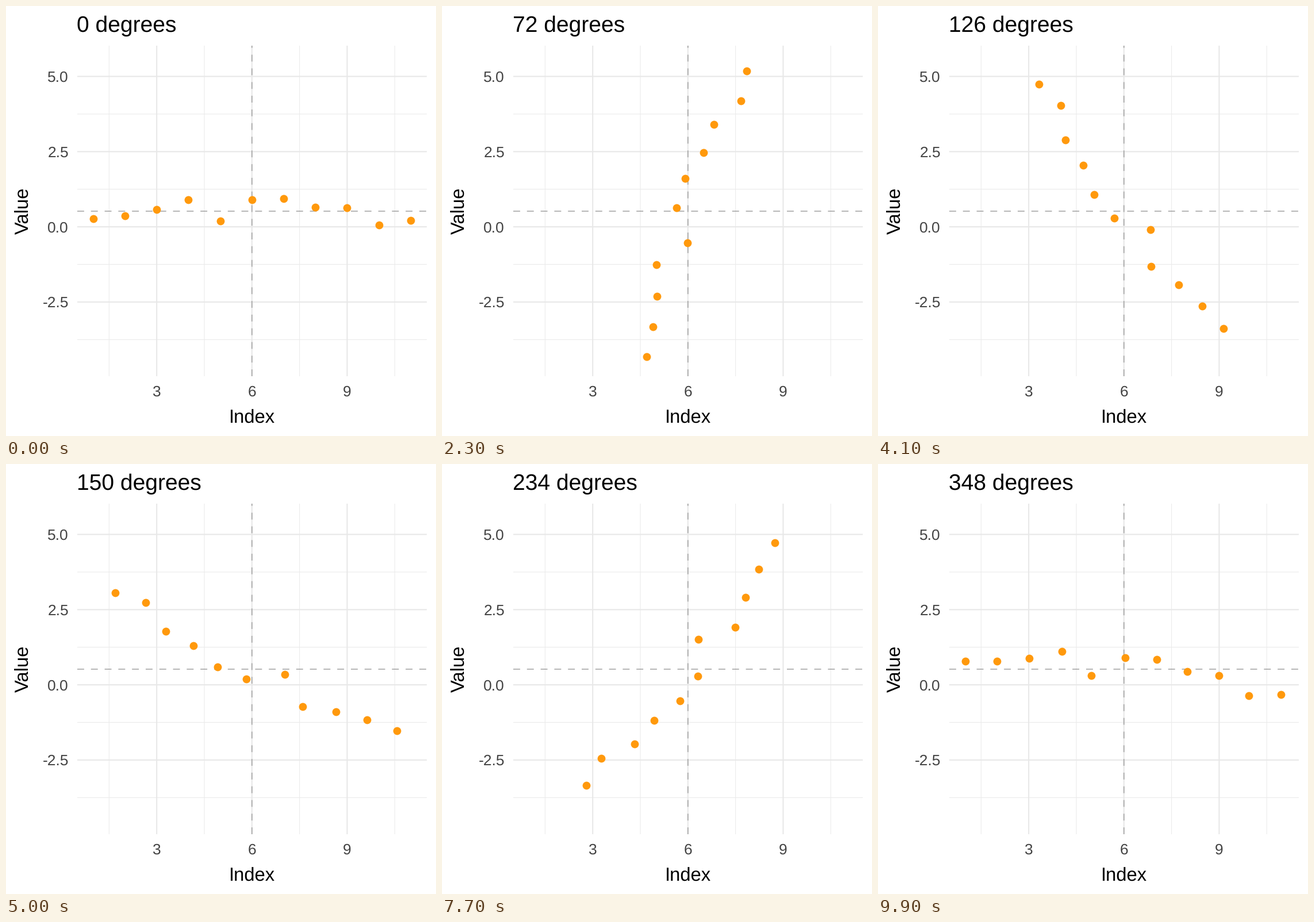
A matplotlib script for the animation above (10 s loop, 748 px wide and 748 px high).

```python
import numpy as np
import matplotlib.pyplot as plt
from matplotlib.animation import FuncAnimation

SIZE, DPI = 748, 72
FRAMES, INTERVAL = 100, 100
LEFT, RIGHT, TOP, BOTTOM = 124, 732, 69, 644
STEP = 6          # degrees between neighbouring states
SLOW = 82         # frames with two per state; one per state afterwards
TITLE, BASE, TICK = 39, 32.8, 26.4   # text sizes in pixels

plt.rcParams["font.family"] = "Liberation Sans"
plt.rcParams["text.hinting"] = "none"
plt.rcParams["lines.scale_dashes"] = False

index = np.arange(1, 12)
value = np.array([0.2655, 0.3721, 0.5729, 0.9082, 0.2017, 0.8984,
                  0.9447, 0.6608, 0.6291, 0.0618, 0.2060])
mid_x, mid_y = index.mean(), value.mean()


def px(x):
    return 427.8 + (np.asarray(x) - 6) * 55.22


def py(y):
    return 384.1 - np.asarray(y) * 52.32


def rotated(degrees):
    a = np.radians(degrees)
    dx, dy = index - mid_x, value - mid_y
    return (mid_x + dx * np.cos(a) - dy * np.sin(a),
            mid_y + dx * np.sin(a) + dy * np.cos(a))


def pose(frame):
    """Return the state before, the share of the way to the next, the label."""
    if frame == 0:
        return 0, 0.0, 0
    if frame < SLOW:
        state, odd = divmod(frame, 2)
        return state * STEP, (odd + 1) / 2, (state + odd) * STEP
    state = SLOW // 2 + frame - SLOW
    return state * STEP, 1.0, state * STEP


fig = plt.figure(figsize=(SIZE / DPI, SIZE / DPI), dpi=DPI, facecolor="white")
ax = fig.add_axes([0, 0, 1, 1])
ax.set_xlim(0, SIZE)
ax.set_ylim(SIZE, 0)
ax.axis("off")


def vline(x, **style):
    ax.plot([px(x)] * 2, [BOTTOM, TOP], snap=False,
            solid_capstyle="butt", **style)


def hline(y, **style):
    ax.plot([LEFT, RIGHT], [py(y)] * 2, snap=False,
            solid_capstyle="butt", **style)


def label(x, y, text, size, color="black", **style):
    return ax.text(x, y, text, fontsize=size, color=color,
                   va="baseline", **style)


minor = dict(color="#ebebeb", lw=1.1, zorder=1)
major = dict(color="#e8e8e8", lw=2.1, zorder=2)
guide = dict(color="#999999", lw=1.4, dashes=(11.9, 11.9),
             dash_capstyle="butt", zorder=3)

for x in (1.5, 4.5, 7.5, 10.5):
    vline(x, **minor)
for y in (-3.75, -1.25, 1.25, 3.75):
    hline(y, **minor)
for x in (3, 6, 9):
    vline(x, **major)
    label(px(x), 679, str(x), TICK, "#444444", ha="center")
for y in (-2.5, 0.0, 2.5, 5.0):
    hline(y, **major)
    label(109, py(y) + 9.2, f"{y:.1f}", TICK, "#444444", ha="right")

vline(mid_x, **guide)
hline(mid_y, **guide)

label(427.8, 725.6, "Index", BASE, ha="center")
label(40, 356.5, "Value", BASE, ha="center", rotation=90,
      rotation_mode="anchor")
title = label(123.3, 44.8, "", TITLE, ha="left")
dots, = ax.plot([], [], "o", ms=13.8, mew=0, color="#ff990c",
                snap=False, zorder=4)


def update(frame):
    start, share, degrees = pose(frame)
    x0, y0 = rotated(start)
    x1, y1 = rotated(start + STEP)
    dots.set_data(px(x0 + (x1 - x0) * share), py(y0 + (y1 - y0) * share))
    title.set_text(f"{degrees} degrees")
    return dots, title


anim = FuncAnimation(fig, update, frames=FRAMES, interval=INTERVAL,
                     repeat=True, repeat_delay=0)
plt.show()
```
